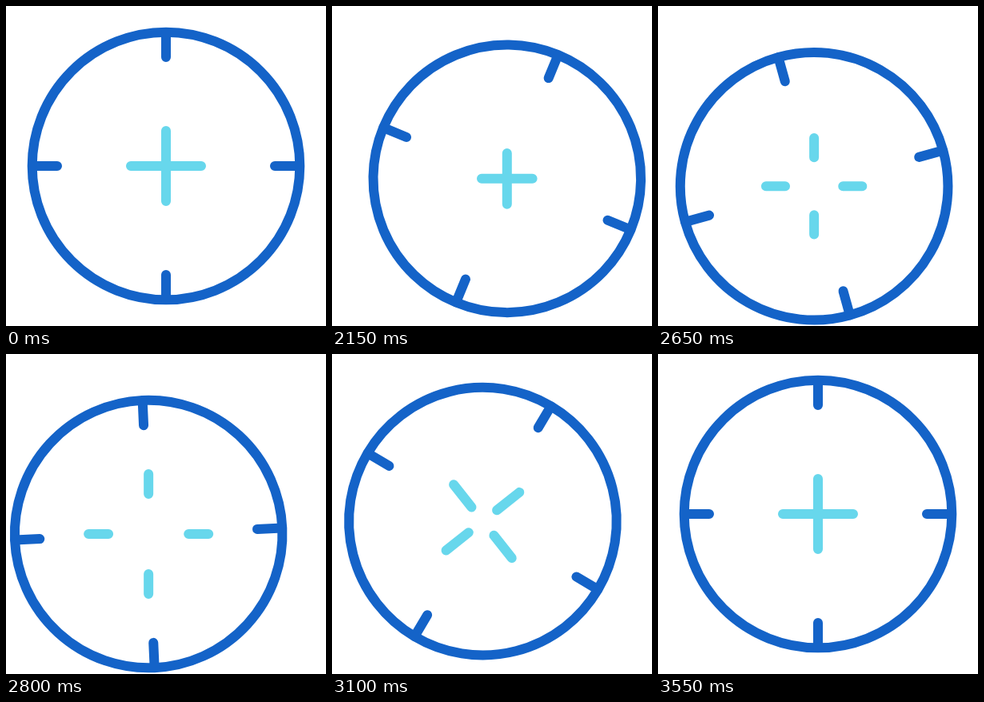
These frames come from a looping animation (400 px wide and 400 px high, 3.57 s). An HTML page:

```html
<!DOCTYPE html>
<html lang="en">
<head>
<meta charset="utf-8">
<title>Crosshair</title>
<style>
  html, body { margin: 0; width: 100%; height: 100%; overflow: hidden; background: #fff; }
  svg { display: block; width: 100vw; height: 100vh; }
  g { fill: none; stroke-width: 12; stroke-linecap: round; }
  #ring { stroke: #1463c8; }
  #cross { stroke: #67d7ec; }
</style>
</head>
<body>
<svg viewBox="0 0 400 400">
  <g id="ring">
    <circle r="167.3"/>
    <path d="M0-136V-167M0 136V167M-136 0H-167M136 0H167"/>
  </g>
  <g id="cross"><path id="arms"/></g>
</svg>
<script>
const LOOP = 3570;
const [ring, cross, arms] = ['ring', 'cross', 'arms'].map(id => document.getElementById(id));

// Resting poses; inner and outer are the ends of each arm of the cross
const home = { x: 0, y: 0, turn: 0, spin: 0, inner: 0, outer: 44 };
const right = { x: 23, y: 24.3, turn: 41, spin: 0, inner: 0, outer: 21.7 };
const left = { x: -25.5, y: 25, turn: 90, spin: 0, inner: 52.8, outer: 78 };
const back = { ...home, turn: 180, spin: 90 };

// Each move eases out along a curve with two bend points
const moves = [
  { start: 2000, time: 500, from: home, to: right, power: 2.2, turnPower: 2.2,
    bends: [{ x: 9.3, y: 8.3 }, { x: 29.3, y: 22.3 }] },
  { start: 2500, time: 500, from: right, to: left, power: 3.2, turnPower: 3.2,
    bends: [{ x: 16.7, y: 26.3 }, { x: -2, y: 25 }] },
  { start: 3000, time: 550, from: left, to: back, power: 4.2, turnPower: 2.05,
    bends: [{ x: -28.5, y: 21.5 }, { x: -1.6, y: 1.2 }] },
];

const easeOut = (u, power) => 1 - (1 - u) ** power;
const mix = (a, b, s) => a + (b - a) * s;
const bezier = (a, b, c, d, s) => {
  const r = 1 - s;
  return r * r * r * a + 3 * r * r * s * b + 3 * r * s * s * c + s * s * s * d;
};

function poseAt(t) {
  const move = moves.findLast(m => t >= m.start);
  if (!move) return home;
  const { start, time, from, to, power, turnPower, bends: [p, q] } = move;
  const u = Math.min(1, (t - start) / time);
  const s = easeOut(u, power);
  const blend = key => mix(from[key], to[key], s);
  return {
    x: bezier(from.x, p.x, q.x, to.x, s),
    y: bezier(from.y, p.y, q.y, to.y, s),
    turn: mix(from.turn, to.turn, easeOut(u, turnPower)),
    spin: blend('spin'),
    inner: blend('inner'),
    outer: blend('outer'),
  };
}

function draw() {
  const { x, y, turn, spin, inner: a, outer: b } = poseAt(performance.now() % LOOP);
  const at = `translate(${200 + x} ${200 + y})`;
  ring.setAttribute('transform', `${at} rotate(${turn})`);
  cross.setAttribute('transform', `${at} rotate(${spin})`);
  arms.setAttribute('d', `M0 ${-a}V${-b}M0 ${a}V${b}M${-a} 0H${-b}M${a} 0H${b}`);
  requestAnimationFrame(draw);
}
draw();
</script>
</body>
</html>
```
